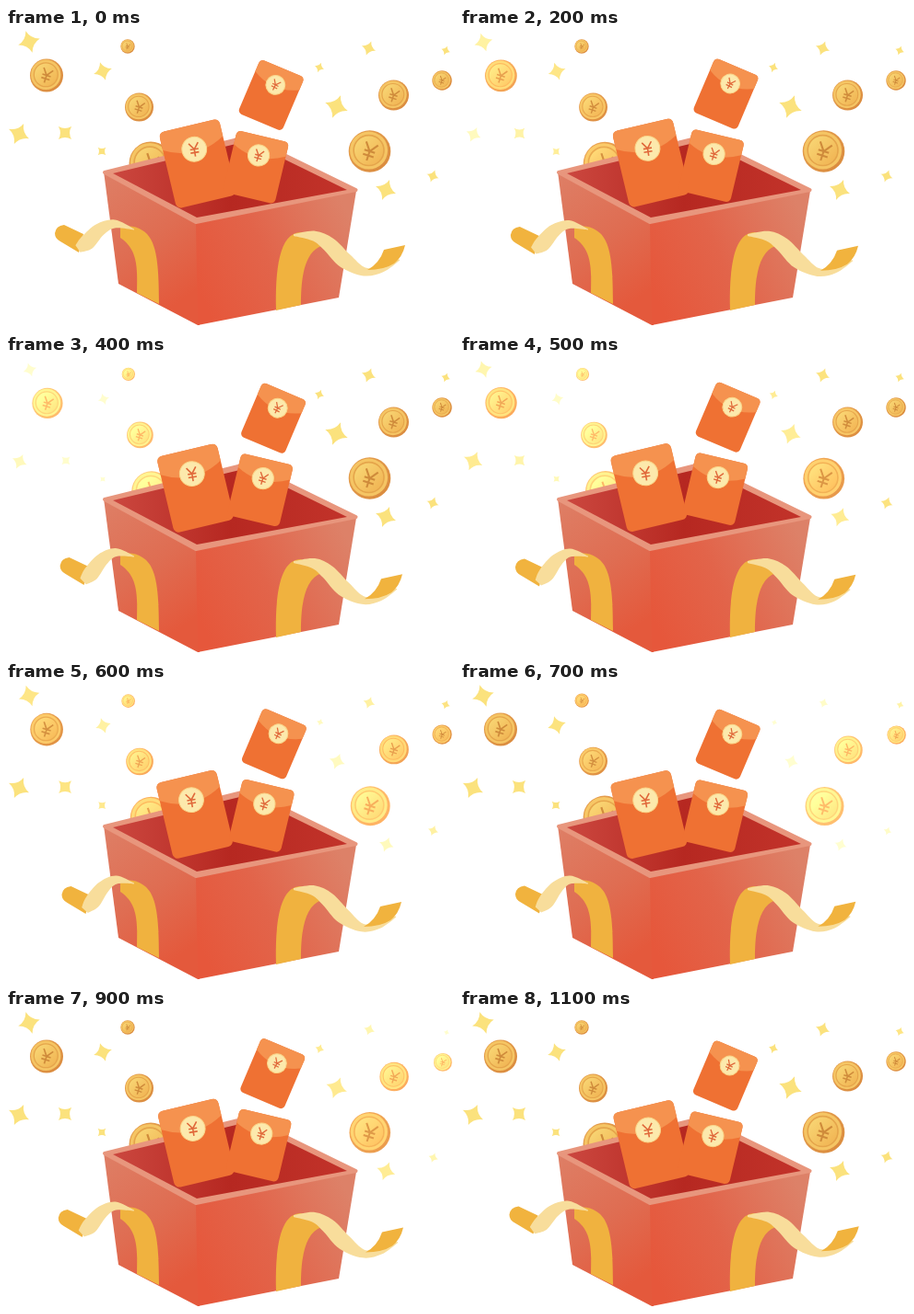
An HTML page that plays this animation: 486 by 325 pixels, repeating every 1200 ms.

```html
<!DOCTYPE html>
<html lang="en">
<head>
<meta charset="utf-8">
<title>Gift box</title>
<style>
html, body { margin: 0; width: 100%; height: 100%; overflow: hidden; background: #fff; }
svg { display: block; width: 486px; height: 325px; }
</style>
</head>
<body>
<svg viewBox="0 0 486 325">
  <defs>
    <linearGradient id="leftFace" x1="0" y1="0" x2=".45" y2="1">
      <stop offset="0" stop-color="#de7f66"/><stop offset=".55" stop-color="#df6d52"/><stop offset="1" stop-color="#e4593c"/>
    </linearGradient>
    <linearGradient id="rightFace" x1="0" y1=".7" x2="1" y2=".3">
      <stop offset="0" stop-color="#e6573b"/><stop offset=".45" stop-color="#e2644a"/><stop offset="1" stop-color="#dd8168"/>
    </linearGradient>
    <linearGradient id="inside" x1="0" y1="0" x2="1" y2="0">
      <stop offset="0" stop-color="#cb473f"/><stop offset=".5" stop-color="#b62821"/><stop offset="1" stop-color="#c2332a"/>
    </linearGradient>
    <linearGradient id="gold" x1="0" y1="0" x2="1" y2="1">
      <stop offset="0" stop-color="#f9da78"/><stop offset="1" stop-color="#f0b04f"/>
    </linearGradient>
    <linearGradient id="edge" x1="0" y1="0" x2="1" y2="1">
      <stop offset="0" stop-color="#e6a14f"/><stop offset="1" stop-color="#d9893d"/>
    </linearGradient>
  </defs>
  <g id="sparks"></g>
  <path d="M106 156L210 210V323L208 323L122 278Z" fill="url(#leftFace)"/>
  <path d="M206 210L380 177L361 293L208 323Z" fill="url(#rightFace)"/>
  <path d="M107 157L262 118.5L379.5 176L206 211Z" fill="#e8967d" stroke="#e8967d" stroke-width="4" stroke-linejoin="round"/>
  <path d="M116 158L262 123L370 176L207 206Z" fill="url(#inside)"/>
  <g id="cards"></g>
  <g id="ribbons">
    <path d="M124 217Q137 213 148 220C163 229 166 253 166 300L142 288C143 258 142 240 124 228Z" fill="#f0b23f"/>
    <path d="M293 307C292 264 296 222 320 222L342 237C324 244 320 270 320 301Z" fill="#f0b23f"/>
  </g>
</svg>
<script>
const LOOP = 1200, STEP = 100;
const GOLD = "#f1b33e", CREAM = "#f8dd9b";
const byId = id => document.getElementById(id);
const make = (tag, attrs, parent) => {
  const el = document.createElementNS("http://www.w3.org/2000/svg", tag);
  for (const key in attrs) el.setAttribute(key, attrs[key]);
  return parent.appendChild(el);
};
const bump = x => Math.abs(x) < 1 ? (1 + Math.cos(Math.PI * x)) / 2 : 0;

function yen(parent, size, color, tilt) {
  make("path", {
    d: "M-4.5 -6L0 0L4.5 -6M0 0V7M-4 0H4M-4 3.2H4", fill: "none", stroke: color,
    "stroke-width": 1.4, transform: `rotate(${tilt}) scale(${size / 7})`
  }, parent);
}

function drawStar(g, r, tilt) {
  const k = r * 0.22;
  make("path", {
    d: `M0 ${-r}Q${k} ${-k} ${r} 0Q${k} ${k} 0 ${r}Q${-k} ${k} ${-r} 0Q${-k} ${-k} 0 ${-r}Z`,
    fill: "#fbe27d", transform: `rotate(${tilt})`
  }, g);
}

function drawCoin(g, r) {
  make("circle", { r, fill: "url(#edge)" }, g);
  make("circle", { cx: -r * .04, cy: -r * .04, r: r * .9, fill: "#f5c564" }, g);
  make("circle", { cx: -r * .04, cy: -r * .04, r: r * .72, fill: "url(#gold)", stroke: "#e5a54b", "stroke-width": r * .07 }, g);
  yen(g, r * .46, "#cf8b3b", 18);
}

// x, y, radius, tilt
const stars = [
  [25, 15, 12.3, 73], [105, 47, 10.3, 73], [14, 115, 12.2, 25], [64, 114, 10, 45], [104, 134, 6, 45],
  [393.5, 22, 8, 20], [340, 43, 5.5, 20], [358.5, 85.5, 13, 20], [477, 24.5, 5, 20], [412, 176, 11.7, 20], [463, 161, 7, 20]
];
// x, y, radius
const coins = [
  [44, 51.5, 18], [132, 20, 7.7], [144.5, 86, 15.5], [157, 147, 23.5],
  [420.5, 73, 16.5], [473, 57, 10.7], [394.5, 134, 22.8]
];
// A wave of light crosses the stage; each spark glows as it passes.
const glowTime = (x, y) => 345 + 1.1 * x - 0.55 * y;
const build = (list, draw, shrink, fade, light) => list.map(([x, y, r, tilt]) => {
  const g = make("g", {}, byId("sparks"));
  draw(g, r, tilt);
  return { g, x, y, shrink, fade, light, mid: glowTime(x, y) };
});
const sparks = [
  ...build(stars, drawStar, .4, .6, .12),
  ...build(coins, drawCoin, .08, .18, .25)
];

// x, y, width, height, tilt, drift x, drift y
const cards = [
  [208, 147.5, 67, 85, -13.4, -3.3, -3.6],
  [271, 151.2, 58, 69, 13.4, 6.3, -5.8],
  [287.6, 73, 52, 63.5, 23, 3.2, -5.6]
].map(([x, y, w, h, tilt, dx, dy]) => {
  const g = make("g", {}, byId("cards"));
  const a = w / 2, b = h / 2, c = w * .09, low = -b + h * .23, dip = -b + h * .46;
  make("rect", { x: -a, y: -b, width: w, height: h, rx: c, fill: "#ef7133" }, g);
  make("path", {
    d: `M${-a} ${low}V${-b + c}Q${-a} ${-b} ${-a + c} ${-b}H${a - c}Q${a} ${-b} ${a} ${-b + c}V${low}Q0 ${dip} ${-a} ${low}Z`,
    fill: "#f5924f"
  }, g);
  const seal = make("g", { transform: `translate(0 ${-b + h * .31})` }, g);
  const r = w * .2;
  make("circle", { r, fill: "#fce9ac", stroke: "#f9d68a", "stroke-width": 1 }, seal);
  yen(seal, r * .6, "#e0683a", 4);
  return { g, x, y, tilt, dx, dy };
});

// Smooth closed band around a centre line of [x, y, width].
function strip(points) {
  const sides = [[], []];
  points.forEach(([x, y, w], i) => {
    const [x0, y0] = points[Math.max(i - 1, 0)];
    const [x1, y1] = points[Math.min(i + 1, points.length - 1)];
    const k = w / 2 / Math.hypot(x1 - x0, y1 - y0);
    const nx = (y0 - y1) * k, ny = (x1 - x0) * k;
    sides[0].push([x - nx, y - ny]);
    sides[1].unshift([x + nx, y + ny]);
  });
  const run = side => side.map(([x, y], i) => {
    const [px, py] = side[Math.max(i - 1, 0)], [nx, ny] = side[Math.min(i + 1, side.length - 1)];
    if (!i) return `${x} ${y}`;
    const [bx, by] = side[Math.max(i - 2, 0)];
    return `C${px + (x - bx) / 6} ${py + (y - by) / 6} ${x - (nx - px) / 6} ${y - (ny - py) / 6} ${x} ${y}`;
  }).join("");
  return `M${run(sides[0])}L${run(sides[1])}Z`;
}

// Centre lines run from the loose end to the end held by the box.
const ribbons = [
  {
    tail: "M63 214Q54 215 53 223Q53 229 59 232L79 244L84 224Z", sway: [7.5, 8], tailFirst: true,
    line: [[78, 240, 9], [88, 233, 17], [102, 219, 14], [118, 213, 9], [139, 219, 1]]
  },
  {
    tail: "M410 241L433 236Q430 249 421 256Q410 263 392 263Q405 256 410 241Z", sway: [-4, 3],
    line: [[427, 252, 1], [408, 262, 7], [389, 265, 9], [368, 253, 17], [350, 235, 16], [334, 226, 11], [312, 225, 2]]
  }
].map(r => {
  const g = make("g", {}, byId("ribbons"));
  const parts = { strip: make("path", { fill: CREAM }, g), tail: make("path", { d: r.tail, fill: GOLD }, g) };
  if (r.tailFirst) g.prepend(parts.tail);
  return { ...r, ...parts };
});

function render(t) {
  const p = (1 - Math.cos(2 * Math.PI * t / LOOP)) / 2;
  for (const c of cards)
    c.g.setAttribute("transform", `translate(${c.x + c.dx * p} ${c.y + c.dy * p}) rotate(${c.tilt})`);
  for (const { line, sway: [sx, sy], strip: el, tail } of ribbons) {
    const moved = line.map(([x, y, w], i) => {
      const free = p * (1 - i / (line.length - 1));
      return [x + sx * free, y + sy * free, w];
    });
    el.setAttribute("d", strip(moved));
    tail.setAttribute("transform", `translate(${sx * p} ${sy * p})`);
  }
  for (const s of sparks) {
    const glow = bump((t - s.mid) / 300);
    s.g.setAttribute("transform", `translate(${s.x + glow} ${s.y + glow}) scale(${1 - s.shrink * glow})`);
    s.g.setAttribute("opacity", 1 - s.fade * glow);
    s.g.style.filter = `brightness(${1 + s.light * glow})`;
  }
}

const start = performance.now();
function tick() {
  const t = (performance.now() - start) % LOOP;
  render(Math.floor(t / STEP) * STEP);
  requestAnimationFrame(tick);
}
tick();
</script>
</body>
</html>
```
